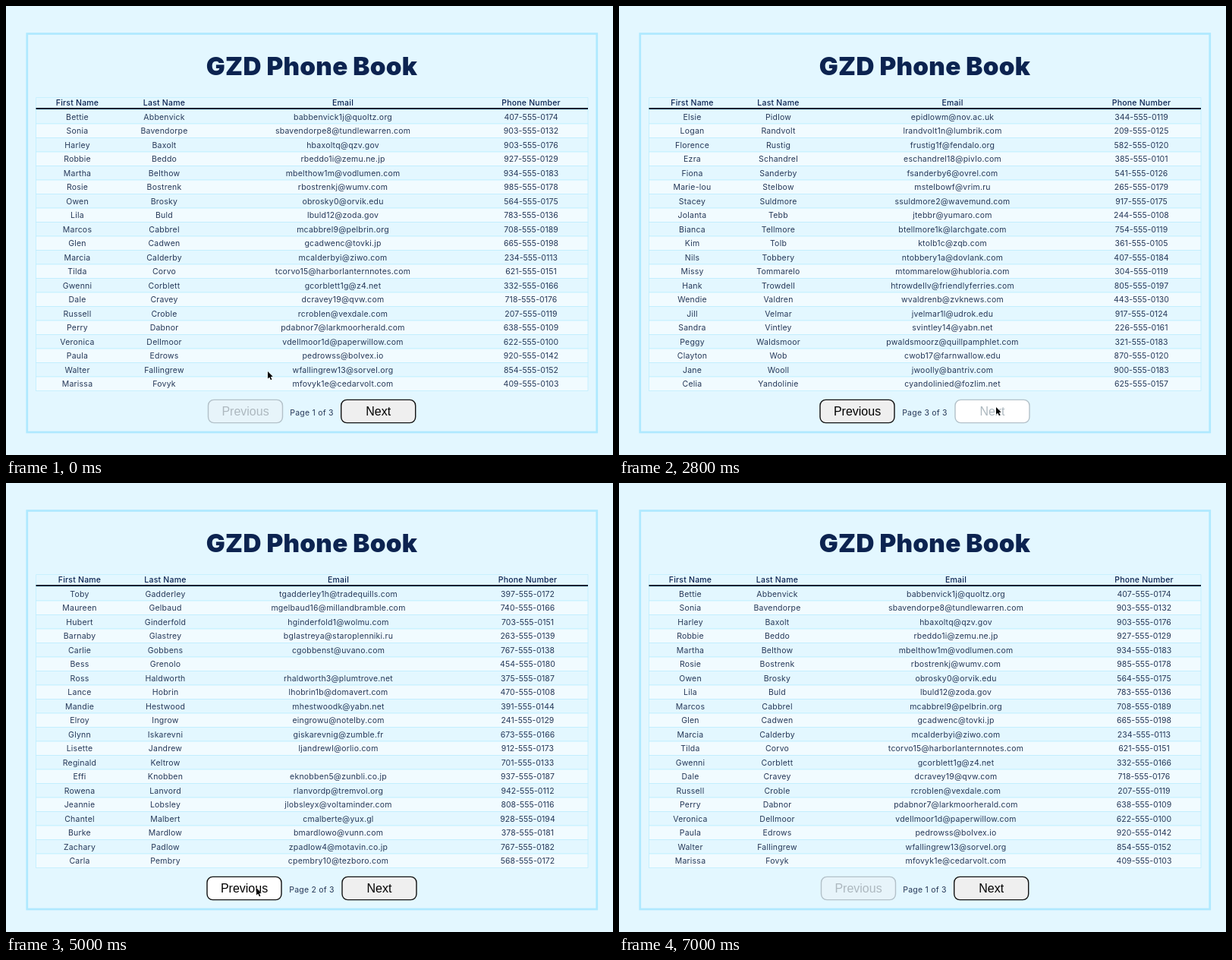
An HTML page that plays this animation: 800 px wide and 591 px high, repeating every 7100 ms.

```html
<!DOCTYPE html>
<html lang="en">
<head>
<meta charset="utf-8">
<title>Phone Book</title>
<style>
  html, body { margin: 0; width: 100%; height: 100%; overflow: hidden; background: #e3f7ff; }
  svg { display: block; width: 800px; height: 591px; }
  text { text-anchor: middle; font: 10.5px Inter, "Open Sans", sans-serif; letter-spacing: .22px; fill: #263858; }
  .title { font-weight: 900; font-size: 33.2px; letter-spacing: .25px; fill: #0c2350; }
  .head { font-weight: 500; fill: #0c2350; }
  .phone { letter-spacing: .05px; }
  .button text { font: 16px "Liberation Sans", Arial, sans-serif; letter-spacing: 0; fill: #000; }
  .button rect { fill: #efefef; stroke: #111; stroke-width: 1.4; }
  .disabled rect { fill: #e7f4fa; stroke: #b3c1c9; }
  .disabled text { fill: #adb8bf; }
  .hover rect { fill: #fff; }
</style>
</head>
<body>
<svg id="stage" viewBox="0 0 800 591"></svg>
<script>
const LOOP = 7100, STEP = 100;
const ROW_TOP = 136.5, ROW_HEIGHT = 18.5, ROWS = 20;
const stage = document.getElementById('stage');

// Each entry: first name, last name, mailbox suffix, mail domain.
const pages = [
  { columns: [94, 208.5, 444, 692], previous: 266.5, next: 441.7, people: `
Bettie Abbenvick 1j quoltz.org
Sonia Bavendorpe 8 tundlewarren.com
Harley Baxolt q qzv.gov
Robbie Beddo 1i zemu.ne.jp
Martha Belthow 1m vodlumen.com
Rosie Bostrenk j wumv.com
Owen Brosky 0 orvik.edu
Lila Buld 12 zoda.gov
Marcos Cabbrel 9 pelbrin.org
Glen Cadwen c tovki.jp
Marcia Calderby i ziwo.com
Tilda Corvo 15 harborlanternnotes.com
Gwenni Corblett 1g z4.net
Dale Cravey 19 qvw.com
Russell Croble n vexdale.com
Perry Dabnor 7 larkmoorherald.com
Veronica Dellmoor 1d paperwillow.com
Paula Edrows s bolvex.io
Walter Fallingrew 13 sorvel.org
Marissa Fovyk 1e cedarvolt.com` },
  { columns: [97, 210, 438, 687.5], previous: 265, next: 443, people: `
Toby Gadderley 1h tradequills.com
Maureen Gelbaud 16 millandbramble.com
Hubert Ginderfold 1 wolmu.com
Barnaby Glastrey a staroplenniki.ru
Carlie Gobbens t uvano.com
Bess Grenolo
Ross Haldworth 3 plumtrove.net
Lance Hobrin 1b domavert.com
Mandie Hestwood k yabn.net
Elroy Ingrow u notelby.com
Glynn Iskarevni g zumble.fr
Lisette Jandrew l orlio.com
Reginald Keltrow
Effi Knobben 5 zunbli.co.jp
Rowena Lanvord p tremvol.org
Jeannie Lobsley x voltaminder.com
Chantel Malbert e yux.gl
Burke Mardlow o vunn.com
Zachary Padlow 4 motavin.co.jp
Carla Pembry 10 tezboro.com` },
  { columns: [96.5, 210, 439.5, 688.5], previous: 265, next: 443, people: `
Elsie Pidlow m nov.ac.uk
Logan Randvolt 1n lumbrik.com
Florence Rustig 1f fendalo.org
Ezra Schandrel 18 pivlo.com
Fiona Sanderby 6 ovrel.com
Marie-lou Stelbow f vrim.ru
Stacey Suldmore 2 wavemund.com
Jolanta Tebb r yumaro.com
Bianca Tellmore 1k larchgate.com
Kim Tolb 1c zqb.com
Nils Tobbery 1a dovlank.com
Missy Tommarelo w hubloria.com
Hank Trowdell v friendlyferries.com
Wendie Valdren b zvknews.com
Jill Velmar 1l udrok.edu
Sandra Vintley 14 yabn.net
Peggy Waldsmoor z quillpamphlet.com
Clayton Wob 17 farnwallow.edu
Jane Wooll y bantriv.com
Celia Yandolinie d fozlim.net` }
];

function add(parent, tag, attributes = {}, content = '') {
  const node = document.createElementNS('http://www.w3.org/2000/svg', tag);
  for (const key in attributes) node.setAttribute(key, attributes[key]);
  node.textContent = content;
  return parent.appendChild(node);
}

const label = (parent, x, y, content, style = '') =>
  add(parent, 'text', { x, y, class: style }, content);

let seed = 41;
function random(limit) {
  seed = (seed * 16807) % 2147483647;
  return seed % limit;
}

const phone = () => `${200 + random(790)}-555-01${String(random(100)).padStart(2, '0')}`;

function drawTable() {
  add(stage, 'rect', { x: 27.75, y: 36.5, width: 751, height: 524.5, fill: 'none', stroke: '#afe9ff', 'stroke-width': 2.7 });
  label(stage, 403, 90.5, 'GZD Phone Book', 'title');
  for (let i = 0; i < ROWS; i++) {
    const y = ROW_TOP + i * ROW_HEIGHT;
    add(stage, 'rect', {
      x: 39.5, y, width: 727.5, height: ROW_HEIGHT,
      fill: i % 2 ? '#f1fbff' : '#e3f7ff', stroke: '#bfeefe', 'stroke-width': .8
    });
  }
  add(stage, 'path', { d: 'M39.5 135V120.5H767V135', fill: 'none', stroke: '#c3effe', 'stroke-width': .8 });
  add(stage, 'path', { d: 'M39.5 135.1H767', stroke: '#06182f', 'stroke-width': 2 });
}

function drawPage({ columns, people }) {
  const group = add(stage, 'g');
  ['First Name', 'Last Name', 'Email', 'Phone Number'].forEach((name, i) =>
    label(group, columns[i], 131, name, 'head'));
  people.trim().split('\n').forEach((line, row) => {
    const [first, last, suffix, domain] = line.split(' ');
    const email = domain ? `${first[0]}${last}${suffix}@${domain}`.toLowerCase() : '';
    [first, last, email, phone()].forEach((value, i) =>
      label(group, columns[i], 149.6 + row * ROW_HEIGHT, value, i === 3 ? 'phone' : ''));
  });
  return group;
}

function makeButton(name) {
  const group = add(stage, 'g');
  add(group, 'rect', { y: 518.4, width: 98, height: 30.2, rx: 7.5 });
  label(group, 49, 539, name);
  return (x, disabled, cursor) => {
    const hover = cursor && cursor.x > x && cursor.x < x + 98 && cursor.y > 518 && cursor.y < 549;
    group.setAttribute('transform', `translate(${x})`);
    group.setAttribute('class', `button${disabled ? ' disabled' : ''}${hover ? ' hover' : ''}`);
  };
}

drawTable();
const groups = pages.map(drawPage);
const setPrevious = makeButton('Previous');
const setNext = makeButton('Next');
const pageLabel = label(stage, 403, 538.7, '');
const ring = add(stage, 'circle', { fill: 'none', stroke: '#c39ad2', 'stroke-width': 1.4 });
const pointer = add(stage, 'path', {
  d: 'M0 0V9.6L2.2 7.6 3.9 11.2 5.4 10.5 3.8 7.1 6.7 6.8Z',
  fill: '#000', stroke: '#fff', 'stroke-width': .7, 'paint-order': 'stroke'
});

// Pointer stops: time, x, y.
const route = [
  [0, 345, 481], [800, 497, 528], [2800, 497, 528], [3500, 508, 531],
  [3900, 508, 531], [4600, 330, 533], [5100, 330, 533], [5500, 325, 529],
  [6500, 325, 529], [6800, 329, 561]
];
const clicks = [1000, 2000, 3600, 4700, 5400];
const turns = [[0, 0], [1100, 1], [2100, 2], [4800, 1], [5500, 0]];

function pointerAt(time) {
  if (time > 6800) return null;
  const i = Math.max(1, route.findIndex(stop => stop[0] >= time));
  const [t0, x0, y0] = route[i - 1], [t1, x1, y1] = route[i];
  const p = (time - t0) / (t1 - t0), eased = p * p * (3 - 2 * p);
  return { x: x0 + (x1 - x0) * eased, y: y0 + (y1 - y0) * eased };
}

function render(time) {
  const cursor = pointerAt(time);
  const current = turns.filter(turn => turn[0] <= time).pop()[1];
  const { previous, next } = pages[current];
  groups.forEach((group, i) => group.setAttribute('display', i === current ? 'inline' : 'none'));
  setPrevious(previous, current === 0, cursor);
  setNext(next, current === pages.length - 1, cursor);
  pageLabel.textContent = `Page ${current + 1} of 3`;

  pointer.setAttribute('display', cursor ? 'inline' : 'none');
  const click = clicks.find(start => time >= start && time < start + 300);
  ring.setAttribute('display', cursor && click !== undefined ? 'inline' : 'none');
  if (!cursor) return;
  pointer.setAttribute('transform', `translate(${cursor.x} ${cursor.y})`);
  const age = time - click;
  ring.setAttribute('cx', cursor.x);
  ring.setAttribute('cy', cursor.y + .5);
  ring.setAttribute('r', age < 100 ? 14.5 : 18.7);
  ring.setAttribute('opacity', age < 100 ? .65 : age < 200 ? .9 : .35);
}

const start = performance.now();
function tick() {
  const elapsed = (performance.now() - start) % LOOP;
  render(Math.floor(elapsed / STEP) * STEP);
  requestAnimationFrame(tick);
}
tick();
</script>
</body>
</html>
```
